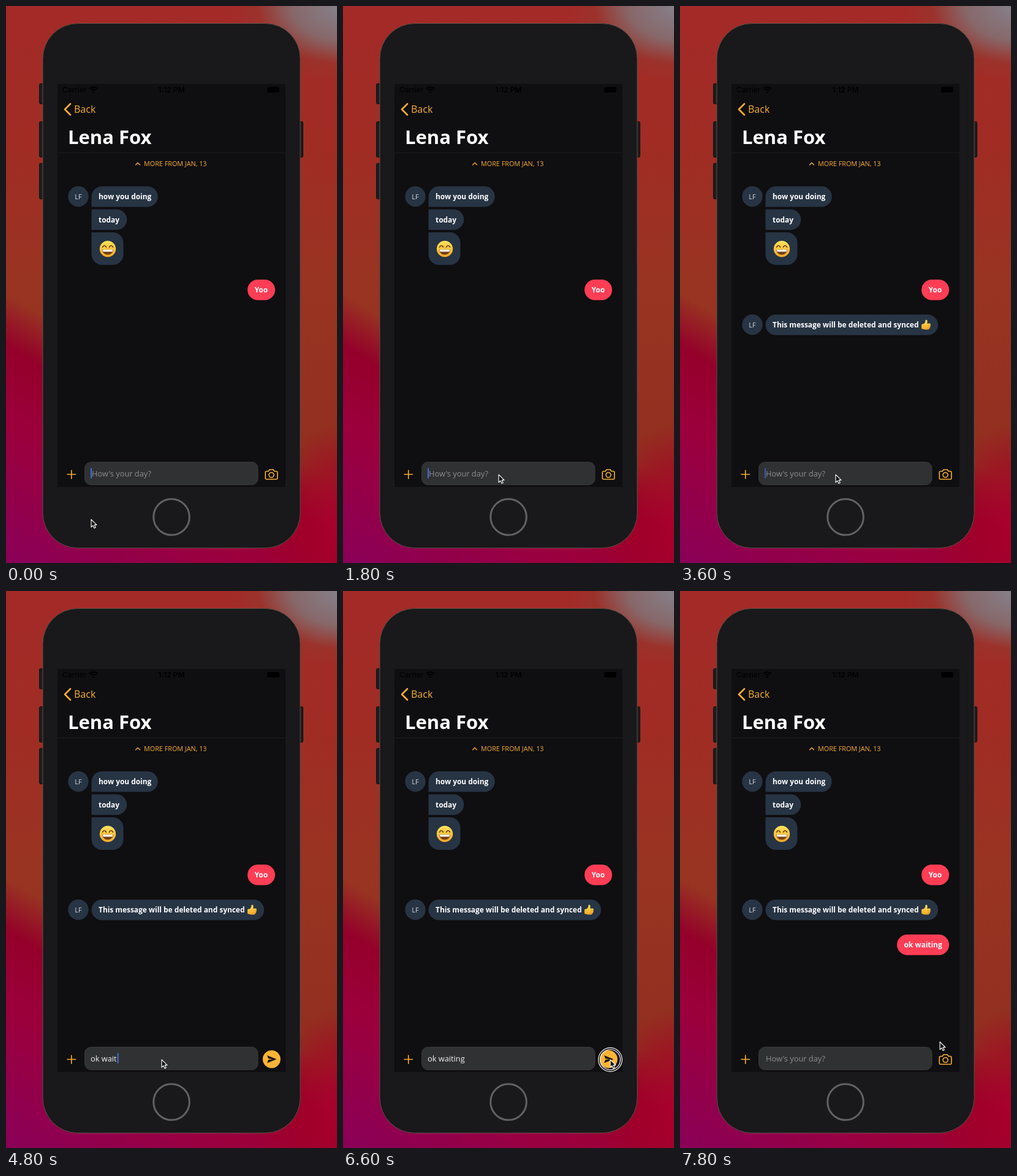
Write an HTML page that moves like this. It is 540x908 px and loops after 8000 ms.

```html
<!DOCTYPE html>
<html lang="en">
<head>
<meta charset="utf-8">
<title>Chat</title>
<style>
  html, body { margin: 0; width: 100%; height: 100%; overflow: hidden; }
  body {
    background:
      radial-gradient(ellipse 185px 125px at 550px 0, #85828c, #87686a 45%, #94392f88 75%, transparent),
      radial-gradient(ellipse 150px 170px at 560px 850px, #ab0030, #a6002688 60%, transparent),
      linear-gradient(210deg, transparent 64%, #94002a 71%, #9c003c 81%, #8a0058 100%),
      linear-gradient(#a42a28, #a02c24 25%, #993422 50%, #922f20 80%);
  }
  svg { display: block; width: 100%; height: 100%; }
  text { font-family: "Open Sans", "Noto Sans", sans-serif; white-space: pre; }
  .bold { font-weight: 700; font-size: 11.9px; fill: #fff; }
  .status { font: 600 12px Inter, sans-serif; }
  .small { font-size: 11px; fill: #d5d9df; text-anchor: middle; }
  .bubble, .avatar { fill: #273444; }
  .mine { fill: #ff3d55; }
  .line { fill: none; stroke: #f8ae35; stroke-width: 1.6; stroke-linecap: round; stroke-linejoin: round; }
  .accent { fill: #f8ae35; }
  .side { fill: #1d1c1e; stroke: #101011; }
</style>
</head>
<body>
<svg viewBox="0 0 540 908">
  <defs>
    <linearGradient id="yellow" x2="0" y2="1">
      <stop stop-color="#ffe45c"/><stop offset="1" stop-color="#f5a623"/>
    </linearGradient>
  </defs>

  <!-- phone -->
  <g class="side">
    <rect x="54.5" y="126.5" width="9" height="33" rx="2"/>
    <rect x="54.5" y="188.5" width="9" height="58" rx="2"/>
    <rect x="54.5" y="256.5" width="9" height="58" rx="2"/>
    <rect x="475.5" y="188.5" width="9" height="58" rx="2"/>
  </g>
  <rect x="60" y="28.5" width="420" height="855" rx="57" fill="#19181a" stroke="#5b5048"/>
  <rect x="84" y="127" width="372" height="657" fill="#0f0e10"/>
  <circle cx="270" cy="833" r="29.3" fill="none" stroke="#626164" stroke-width="3"/>

  <!-- status bar -->
  <text class="status" x="92" y="141" style="font-weight:400">Carrier</text>
  <text class="status" x="270" y="141" text-anchor="middle">1:12 PM</text>
  <path d="M136 135a9 9 0 0 1 13 0M138.500 137.500a5.500 5.500 0 0 1 8 0" fill="none" stroke="#000" stroke-width="2"/>
  <circle cx="142.500" cy="140" r="1.500"/>
  <rect x="426" y="132" width="20" height="9" rx="2.500"/>

  <!-- header -->
  <path class="line" style="stroke-width:2.600" d="M105 159.500L96 168.500L105 177.500"/>
  <text class="accent" x="111" y="174" font-size="16">Back</text>
  <text x="101" y="225" font-size="31" font-weight="700" fill="#fff">Lena Fox</text>
  <path d="M84 239.500H456" stroke="#1c1b1d"/>
  <path class="line" style="stroke-width:1.300" d="M211.500 259L215 255.500L218.500 259"/>
  <text class="accent" x="225" y="261" font-size="10.8">MORE FROM JAN, 13</text>

  <!-- messages -->
  <g id="avatar">
    <circle class="avatar" cx="118" cy="310.500" r="16.700"/>
    <text class="small" x="118" y="314.500">LF</text>
  </g>
  <path class="bubble" d="M139.500 327.500V311a17 17 0 0 1 17-17H231a16.750 16.750 0 0 1 0 33.500Z"/>
  <text class="bold" x="151" y="315">how you doing</text>
  <path class="bubble" d="M139.500 331.500H180.500a16.750 16.750 0 0 1 0 33.500H139.500Z"/>
  <text class="bold" x="151" y="352.500">today</text>
  <path class="bubble" d="M139.500 369H174.500a17 17 0 0 1 17 17V405a17 17 0 0 1-17 17H156.500a17 17 0 0 1-17-17Z"/>
  <g transform="translate(166 396)">
    <circle r="13.200" fill="url(#yellow)"/>
    <path d="M-8.500-3Q-5.500-8-2.500-3M2.500-3Q5.500-8 8.500-3" fill="none" stroke="#6b3d12" stroke-width="1.700" stroke-linecap="round"/>
    <path d="M-9 1H9Q8 9.500 0 9.500T-9 1Z" fill="#74401a"/>
    <path d="M-8.500 1.300H8.500L7.500 4.500H-7.500Z" fill="#fff"/>
  </g>
  <rect class="mine" x="394" y="446" width="45" height="33.500" rx="16.750"/>
  <text class="bold" x="405.500" y="467">Yoo</text>

  <g id="reply">
    <use href="#avatar" y="209"/>
    <rect class="bubble" x="139.500" y="503" width="281.500" height="33.500" rx="16.750"/>
    <text class="bold" x="151" y="524">This message will be deleted and synced</text>
    <path d="M394 519L398 518Q401 515 400.500 512Q402.500 510.500 403.500 513Q404 515 403 517.500L408 517.500Q409.500 519 408.500 520.500Q409 522.500 408 523.500Q408 525.500 406.500 526Q406 527.500 404.500 527.500H399L394 526Z" fill="url(#yellow)"/>
    <path d="M404 520.500H408M404 523.300H407.500M403.500 525.600H406.500" stroke="#d98b20" stroke-width=".7"/>
  </g>
  <g id="sent">
    <rect class="mine" x="354" y="560" width="85" height="33.500" rx="16.750"/>
    <text class="bold" x="365.500" y="581">ok waiting</text>
  </g>

  <!-- input row -->
  <path class="line" d="M100 763.500H113.500M106.750 757V770.500"/>
  <rect x="128.500" y="743.500" width="282.500" height="37" rx="10" fill="#303133" stroke="#38393b"/>
  <text id="placeholder" x="140" y="767" font-size="12.8" fill="#8d8e91">How's your day?</text>
  <text id="typed" x="138" y="767" font-size="12.8" fill="#f2f2f2"></text>
  <rect id="caret" y="753.500" width="2" height="16.500" fill="#416fe0"/>
  <g id="camera" class="line">
    <path d="M425 758.500H428L430 755.800H436L438 758.500H441Q442.800 758.500 442.800 760.500V769.500Q442.800 771.500 441 771.500H425Q423.200 771.500 423.200 769.500V760.500Q423.200 758.500 425 758.500Z"/>
    <circle cx="433" cy="764.500" r="4"/>
  </g>
  <g id="send">
    <circle cx="433.300" cy="763.300" r="14.500" fill="#fdb436"/>
    <path d="M426 757L441.500 763.300L426 769.600L428 764.300L435 763.300L428 762.300Z" fill="#19181a"/>
  </g>

  <!-- pointer -->
  <g id="pointer">
    <g id="press" fill="none">
      <circle r="18.500" stroke="#111" stroke-width="3"/>
      <circle r="19.300" stroke="#fff" stroke-width="1.200"/>
      <circle r="16.500" stroke="#fff" stroke-width="1.200"/>
    </g>
    <path d="M0 0V12.500L2.900 9.800L4.900 14.300L7.200 13.300L5.200 8.900H9Z" fill="#111" stroke="#fff" stroke-width="1.100" stroke-linejoin="round"/>
  </g>
</svg>

<script>
const LOOP = 8000, STEP = 200;
const REPLY_AT = 2200, TYPE_AT = 3650, KEY_MS = 160, SEND_AT = 6800;
const MESSAGE = "ok waiting";
const CARET_IDLE = [1, 1, 0, 0.7, 1];
const CARET_TYPED = [1, 1, 0.7, 0, 0];
const PATH = [
  [500, 139, 837], [1500, 254, 764], [5400, 254, 764],
  [6300, 436, 764], [7000, 436, 764], [7700, 424, 735]
];

const $ = id => document.getElementById(id);
const show = (id, on) => $(id).setAttribute("visibility", on ? "visible" : "hidden");
const ease = p => p * p * (3 - 2 * p);

function pointerAt(t) {
  const next = PATH.findIndex(point => point[0] > t);
  if (next < 1) return (next ? PATH[PATH.length - 1] : PATH[0]).slice(1);
  const [t0, x0, y0] = PATH[next - 1], [t1, x1, y1] = PATH[next];
  const p = ease((t - t0) / (t1 - t0));
  return [x0 + (x1 - x0) * p, y0 + (y1 - y0) * p];
}

function caretOpacity(t) {
  if (t >= TYPE_AT && t < 5800) return 1;
  return (t < TYPE_AT ? CARET_IDLE : CARET_TYPED)[t / STEP % 5];
}

function draw(t) {
  const keys = t < SEND_AT ? Math.max(0, Math.floor((t - TYPE_AT) / KEY_MS)) : 0;
  const typed = $("typed");
  typed.textContent = MESSAGE.slice(0, keys);
  show("placeholder", !keys);
  show("camera", !keys);
  show("send", keys);
  show("reply", t >= REPLY_AT);
  show("sent", t >= SEND_AT);
  show("press", t >= 6400 && t < SEND_AT);
  $("caret").setAttribute("x", keys ? 139 + typed.getComputedTextLength() : 138);
  $("caret").setAttribute("opacity", caretOpacity(t));
  $("pointer").setAttribute("transform", `translate(${pointerAt(t)})`);
}

const start = performance.now();
function tick() {
  const t = (performance.now() - start) % LOOP;
  draw(Math.floor(t / STEP) * STEP);
  requestAnimationFrame(tick);
}
tick();
</script>
</body>
</html>
```
